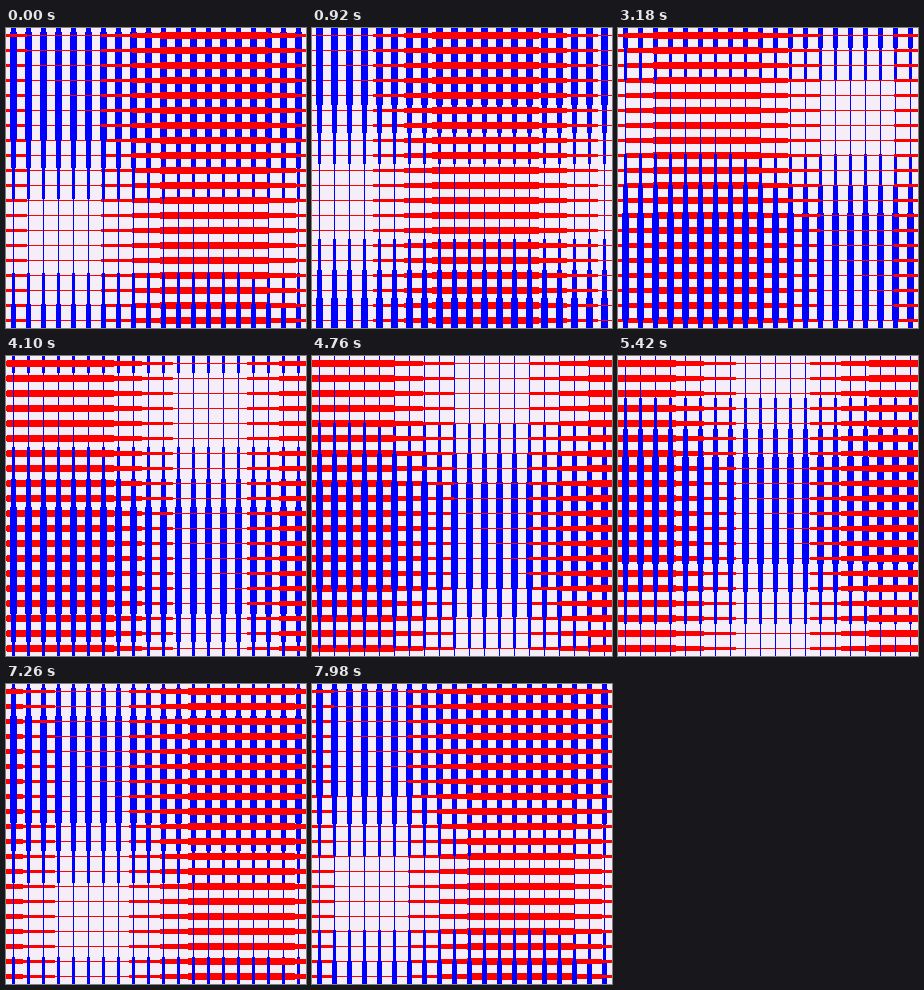
An HTML page with a canvas for the animation above (8 s loop, 300 px wide and 300 px high).

```html
<!DOCTYPE html>
<html lang="en">
<head>
<meta charset="utf-8">
<title>Woven waves</title>
<style>
  html, body { margin: 0; width: 100%; height: 100%; overflow: hidden; background: #f5eef8; }
  canvas { display: block; }
</style>
</head>
<body>
<canvas id="stage" width="300" height="300"></canvas>
<script>
const SIZE = 300, GAP = 15, LOOP = 8000, FRAME = 20;
const REACH = 3.49; // greatest growth to each side of the one-pixel core
const ctx = document.getElementById('stage').getContext('2d');

// Runs of equal thickness along a line that is thinnest at `low`.
function profile(low) {
  const runs = [];
  for (let p = 0; p < SIZE; p++) {
    const s = Math.sin(Math.PI * (p + 0.5 - low) / SIZE) ** 2;
    const side = Math.round(REACH * s);
    const last = runs[runs.length - 1];
    if (last && last.side === side) last.length++;
    else runs.push({ start: p, length: 1, side });
  }
  return runs;
}

function drawLine(runs, core, color, vertical) {
  ctx.fillStyle = color;
  for (const { start, length, side } of runs) {
    const edge = core - side, width = 2 * side + 1;
    if (vertical) ctx.fillRect(edge, start, width, length);
    else ctx.fillRect(start, edge, length, width);
  }
}

function draw(time) {
  const shift = SIZE * (Math.floor(time / FRAME) * FRAME % LOOP) / LOOP;
  const rows = profile(58 - shift);
  const columns = profile(208 - shift);
  ctx.fillStyle = '#f5eef8';
  ctx.fillRect(0, 0, SIZE, SIZE);
  // Red lies on top along and above the diagonal, blue below it.
  for (let core = SIZE - 8; core > 0; core -= GAP) {
    drawLine(columns, core, '#00f', true);
    drawLine(rows, core, '#f00', false);
  }
}

const begin = performance.now();
function tick() {
  draw(performance.now() - begin);
  requestAnimationFrame(tick);
}
tick();
</script>
</body>
</html>
```
